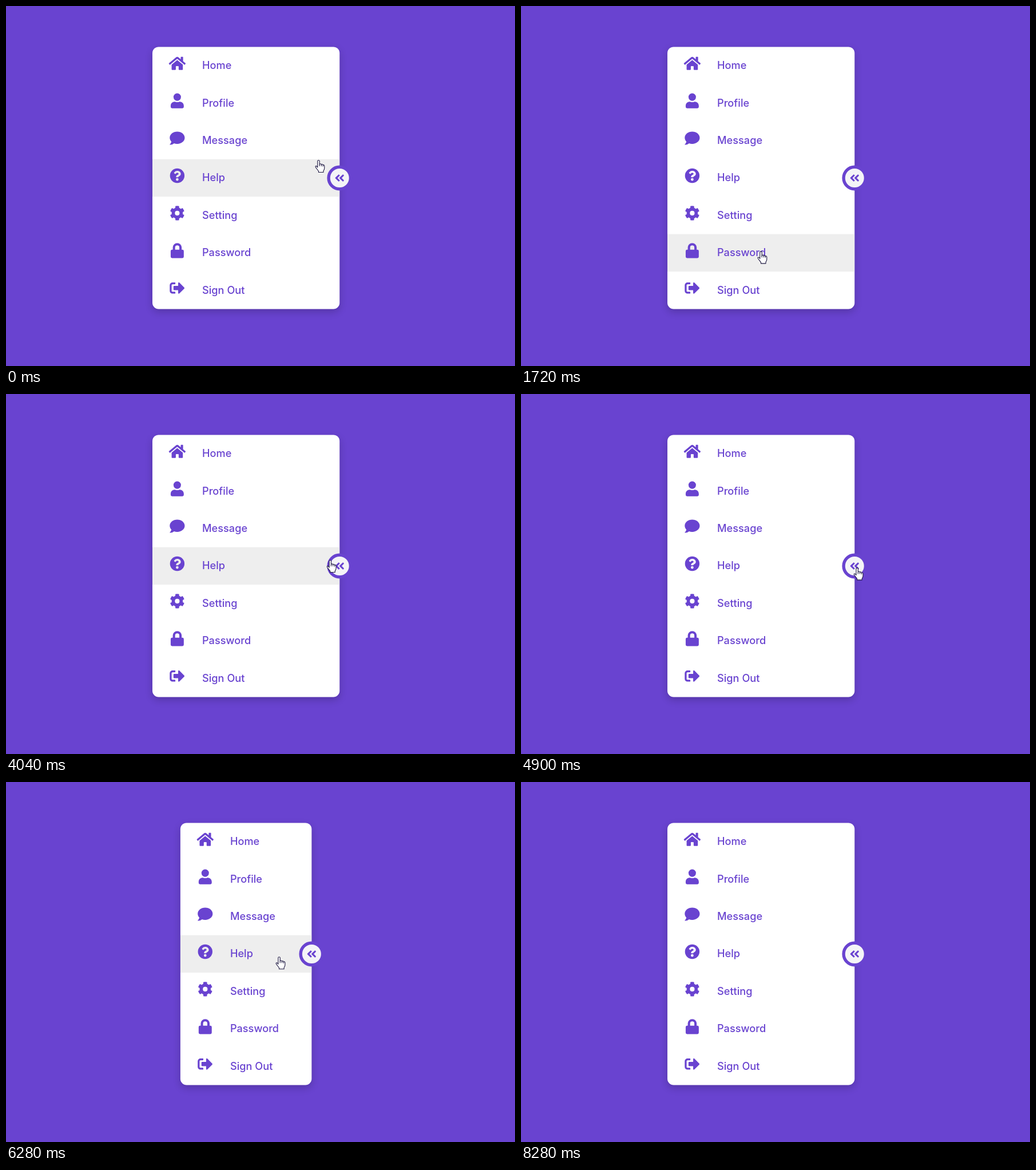
An HTML page with a canvas that plays this animation: 890x629 px, repeating every 9.84 s.

```html
<!DOCTYPE html>
<html lang="en">
<head>
<meta charset="utf-8">
<title>Sidebar menu</title>
<style>
  html, body { margin: 0; width: 100%; height: 100%; overflow: hidden; background: #6943d0; }
  canvas { display: block; }
</style>
</head>
<body>
<canvas id="stage" width="890" height="629"></canvas>
<script>
const ctx = document.getElementById('stage').getContext('2d');
const LOOP = 9840, PURPLE = '#6943d0';
const TOP = 71.4, ROW = 65.43, HEIGHT = 7 * ROW, CENTER = 419.65;
const WIDE = 327.3, NARROW = 87.3, TOGGLE_Y = 300.5;

// Icon paths live on a 512-unit grid.
const icons = {
  home: [576, 'M280.4 148.3L96 300V464a16 16 0 0 0 16 16H224a16 16 0 0 0 16-16V368a16 16 0 0 1 16-16h64a16 16 0 0 1 16 16v96a16 16 0 0 0 16 16H464a16 16 0 0 0 16-16V300L295.7 148.3a12.2 12.2 0 0 0-15.3 0zM571.6 251.5L488 182.6V44a12 12 0 0 0-12-12h-56a12 12 0 0 0-12 12v72.6L318.5 43a48 48 0 0 0-61 0L4.3 251.5a12 12 0 0 0-1.6 16.9l25.5 31A12 12 0 0 0 45.2 301L280.4 107.3a12.2 12.2 0 0 1 15.3 0L530.9 301a12 12 0 0 0 16.9-1.6l25.5-31a12 12 0 0 0-1.7-16.9z'],
  user: [448, 'M224 256a128 128 0 1 0 0-256a128 128 0 1 0 0 256zm89.6 32h-16.7a175 175 0 0 1-145.8 0h-16.7C60.2 288 0 348.2 0 422.4V464a48 48 0 0 0 48 48h352a48 48 0 0 0 48-48v-41.6c0-74.2-60.2-134.4-134.4-134.4z'],
  message: [512, 'M256 32C114.6 32 0 125.1 0 240c0 49.6 21.4 95 57 130.7C44.5 421 2.7 466 2.2 466.5C-2 471 1 480 8 480c66.3 0 116-31.8 140.6-51.4 32.7 12.3 69 19.4 107.4 19.4 141.4 0 256-93.1 256-208S397.4 32 256 32z'],
  help: [512, 'M504 256a248 248 0 1 1-496 0a248 248 0 1 1 496 0zM262.7 90c-54.5 0-89.3 23-116.6 63.8-3.5 5.3-2.4 12.4 2.7 16.2l34.7 26.3c5.2 4 12.6 3 16.7-2.1 17.8-22.7 30-35.8 57.3-35.8 20.4 0 45.7 13.1 45.7 33 0 15-12.4 22.6-32.6 34C247 238.500 216 255 216 296v4a12 12 0 0 0 12 12h56a12 12 0 0 0 12-12v-1.300c0-28.500 83.200-29.700 83.200-106.700 0-58-60.200-102-116.500-102zM256 338a46 46 0 1 0 0 92a46 46 0 1 0 0-92z'],
  lock: [448, 'M400 224h-24v-72a152 152 0 0 0-304 0v72H48a48 48 0 0 0-48 48v192a48 48 0 0 0 48 48h352a48 48 0 0 0 48-48V272a48 48 0 0 0-48-48zm-104 0H152v-72a72 72 0 0 1 144 0z'],
  exit: [512, 'M497 273L329 441c-15 15-41 4.500-41-17v-96H152a24 24 0 0 1-24-24v-96a24 24 0 0 1 24-24h136V88c0-21.400 25.900-32 41-17l168 168c9.300 9.400 9.300 24.600 0 34zM192 436v-40a12 12 0 0 0-12-12H96a32 32 0 0 1-32-32V160a32 32 0 0 1 32-32h84a12 12 0 0 0 12-12V76a12 12 0 0 0-12-12H96a96 96 0 0 0-96 96v192a96 96 0 0 0 96 96h84a12 12 0 0 0 12-12z'],
  chevrons: [448, 'M223.700 239l136-136a24 24 0 0 1 34 0l22.600 22.600a24 24 0 0 1 0 34L320 256l96.300 96.400a24 24 0 0 1 0 34L393.700 409a24 24 0 0 1-34 0l-136-136a24 24 0 0 1 0-34zM31.700 273l136 136a24 24 0 0 0 34 0l22.600-22.600a24 24 0 0 0 0-34L128 256l96.300-96.400a24 24 0 0 0 0-34L201.700 103a24 24 0 0 0-34 0l-136 136a24 24 0 0 0 0 34z']
};
for (const name in icons) icons[name][1] = new Path2D(icons[name][1]);

const tooth = new Path2D('M-64-150V-230Q-64-240-54-242Q0-254 54-242Q64-240 64-230V-150z');
const hand = new Path2D('M-2.2 13V2Q-2.2 .5-.5 .5T1.2 2V8Q1.3 6.7 2.8 6.8T4.4 8.4Q4.6 7.3 6 7.5T7.3 9.2Q7.8 8.2 8.8 8.7T9.8 10.5V14.5Q9.8 16.5 8 19V21.5H-.5V19.5Q-2 17.5-3.5 15.5Q-6.5 12-5.8 11T-3.5 11.3z');
const creases = new Path2D('M1.2 8V11M4.4 8.4V11M7.3 9.2V11.500');

const items = [['home', 'Home'], ['user', 'Profile'], ['message', 'Message'], ['help', 'Help'],
  ['cog', 'Setting'], ['lock', 'Password'], ['exit', 'Sign Out']];

// Pointer keys: time, x, y of the fingertip.
const pointerKeys = [
  [0, 547, 269], [150, 547, 269], [650, 430, 92], [800, 402, 92], [1110, 405, 150],
  [1180, 408, 165], [1720, 420, 428], [1950, 418, 514], [2050, 418, 514], [2410, 419, 220],
  [2800, 373, 84], [2900, 373, 84], [2950, 368, 83], [3050, 368, 83], [3340, 395, 162],
  [3430, 395, 162], [3640, 411, 224], [4039, 411, 224], [4040, 567, 290], [4300, 649, 306],
  [4450, 640, 309], [4660, 598, 304], [4780, 598, 304], [4990, 581, 303], [5300, 575, 304],
  [5740, 455, 305], [5990, 455, 305], [6200, 459, 304], [6590, 551, 310], [6980, 583, 303],
  [7050, 581, 301], [7210, 595, 301], [8000, 595, 301], [8200, 784, 550], [8280, 784, 550]
];

function pointerAt(t) {
  const i = pointerKeys.findIndex(key => key[0] > t);
  if (i < 0) return null;
  const [t0, x0, y0] = pointerKeys[i - 1], [t1, x1, y1] = pointerKeys[i];
  const k = (t - t0) / (t1 - t0);
  return { x: x0 + (x1 - x0) * k, y: y0 + (y1 - y0) * k };
}

function ease(t, start, length) {
  const k = Math.min(1, Math.max(0, (t - start) / length));
  return k * k * (3 - 2 * k);
}

function withTransform(x, y, scaleX, scaleY, draw) {
  ctx.save();
  ctx.translate(x, y);
  ctx.scale(scaleX, scaleY);
  draw();
  ctx.restore();
}

function drawIcon(name, x, y, size, flip = 1) {
  const scale = size / 512;
  withTransform(x, y, scale * flip, scale, () => {
    ctx.fillStyle = ctx.strokeStyle = PURPLE;
    if (name === 'cog') return drawCog();
    const [width, path] = icons[name];
    ctx.translate(-width / 2, -256);
    ctx.fill(path, 'evenodd');
  });
}

function drawCog() {
  ctx.lineWidth = 112;
  ctx.beginPath();
  ctx.arc(0, 0, 136, 0, Math.PI * 2);
  ctx.stroke();
  for (let i = 0; i < 6; i++) {
    ctx.fill(tooth);
    ctx.rotate(Math.PI / 3);
  }
}

function drawPanel(left, width, hovered) {
  const box = new Path2D();
  box.roundRect(left, TOP, width, HEIGHT, 11);
  ctx.save();
  ctx.shadowColor = 'rgba(0,0,0,.2)';
  ctx.shadowBlur = 14;
  ctx.shadowOffsetY = 5;
  ctx.fillStyle = '#fff';
  ctx.fill(box);
  ctx.restore();

  ctx.save();
  ctx.clip(box);
  if (hovered >= 0) {
    ctx.fillStyle = '#eee';
    ctx.fillRect(left, TOP + hovered * ROW, width, ROW);
  }
  ctx.font = '500 18.2px Inter, "Open Sans", sans-serif';
  items.forEach(([icon, label], i) => {
    drawIcon(icon, left + 43.4, 100.2 + i * ROW, 26.2);
    ctx.fillStyle = PURPLE;
    ctx.fillText(label, left + 87, 110.2 + i * ROW);
  });
  ctx.restore();
}

function drawToggle(x, flip) {
  ctx.beginPath();
  ctx.arc(x, TOGGLE_Y, 19.2, 0, Math.PI * 2);
  ctx.fillStyle = '#f4f4f7';
  ctx.fill();
  ctx.strokeStyle = PURPLE;
  ctx.lineWidth = 5.4;
  ctx.stroke();
  drawIcon('chevrons', x, TOGGLE_Y, 19.6, flip);
}

function drawHand({ x, y }) {
  withTransform(x, y, 1, 1, () => {
    ctx.fillStyle = '#fff';
    ctx.strokeStyle = '#1c1740';
    ctx.lineWidth = 1.1;
    ctx.lineJoin = 'round';
    ctx.fill(hand);
    ctx.stroke(hand);
    ctx.stroke(creases);
  });
}

function hoveredRow(pointer, left, right) {
  if (!pointer || pointer.x < left || pointer.x > right) return -1;
  if (Math.hypot(pointer.x - right, pointer.y - TOGGLE_Y) < 19) return -1;
  const row = Math.floor((pointer.y - TOP) / ROW);
  return row >= 0 && row < items.length ? row : -1;
}

function render(t) {
  const closed = ease(t, 5070, 500) - ease(t, 6000, 500);
  const width = WIDE + (NARROW - WIDE) * closed;
  const left = CENTER - width / 2, right = left + width;
  const pointer = pointerAt(t);

  ctx.fillStyle = PURPLE;
  ctx.fillRect(0, 0, 890, 629);
  drawPanel(left, width, hoveredRow(pointer, left, right));
  drawToggle(right, t >= 5070 && t < 6040 ? -1 : 1);
  if (pointer) drawHand(pointer);
}

const start = performance.now();
function tick() {
  render((performance.now() - start) % LOOP);
  requestAnimationFrame(tick);
}
tick();
</script>
</body>
</html>
```
